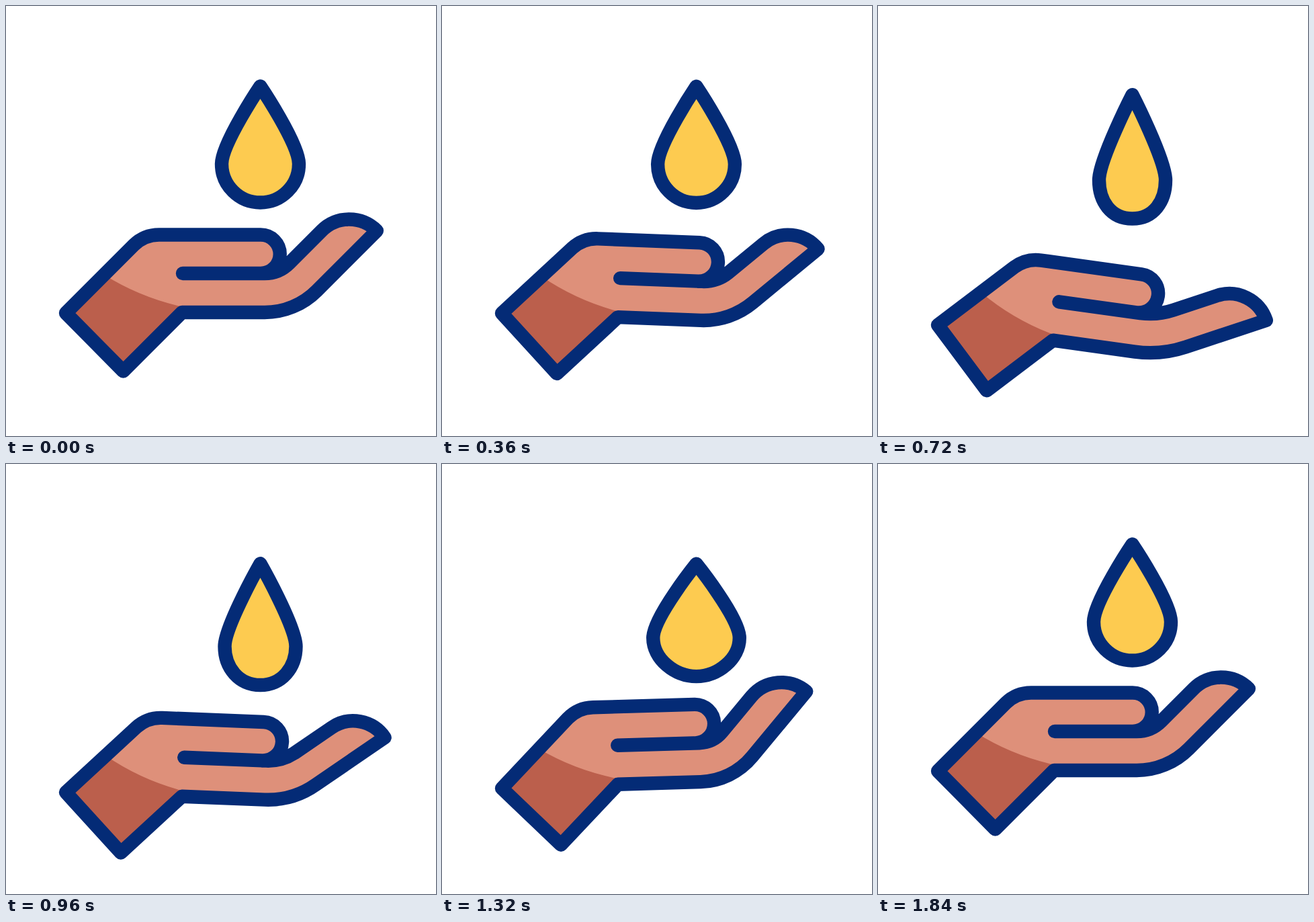
These frames come from a looping animation (640x640 px, 2 s). An HTML page:

```html
<!DOCTYPE html>
<html lang="en">
<head>
<meta charset="utf-8">
<title>Drop and hand</title>
<style>
  html, body { margin: 0; width: 100%; height: 100%; overflow: hidden; background: #fff; }
  svg { display: block; width: 100vw; height: 100vh; }
  .line { stroke: #042b76; stroke-width: 20.4; stroke-linecap: round; stroke-linejoin: round; }
</style>
</head>
<body>
<svg viewBox="0 0 640 640">
  <path id="drop" class="line" fill="#fdcb50"/>
  <g id="hand">
    <path id="skin" fill="#de907a"/>
    <path fill="#bb5f4c" d="M146 400Q200 434 264 448L262 456L174.5 543.5L89 457Z"/>
    <path id="outline" class="line" fill="none"/>
  </g>
</svg>
<script>
const LOOP = 2000, STEP = 40, ROUND = 0.5523;
const el = id => document.getElementById(id);
const drop = el('drop'), hand = el('hand'), skin = el('skin'), outline = el('outline');

function ease(t, from, to) {
  const s = Math.min(1, Math.max(0, (t - from) / (to - from)));
  return (1 - Math.cos(Math.PI * s)) / 2;
}

// Rises from 0 to 1 at the peak, then falls back to 0
const pulse = (t, from, peak, to) => ease(t, from, peak) - ease(t, peak, to);

// Control points of the raised fingers, bent up by an angle.
// The middle line of the bend keeps its length.
function fingers(deg) {
  const f = deg * Math.PI / 180, sin = Math.sin(f), cos = Math.cos(f);
  const half = 29, len = 68.5, tip = 2 * half, k = ROUND * tip;
  const r = 63.2 / f, h = 4 / 3 * Math.tan(f / 4);
  const up = h * (r - half), low = h * (r + half);
  const at = (a, b) => [385 + r * sin + a * cos + b * sin, 427 - r * (1 - cos) - a * sin + b * cos];
  return [
    [385 + up, 398], at(-up, -half), at(0, -half),
    at(len, -half),
    at(len + k, -half), at(len + tip, half - k), at(len + tip, half),
    at(0, half),
    at(-low, half), [385 + low, 456], [385, 456]
  ];
}

const rest = fingers(45), flatPose = fingers(26), curlPose = fingers(49.1);

function handPath(flat, curl) {
  const p = rest.map((q, i) => q.map((v, j) =>
    (v + flat * (flatPose[i][j] - v) + curl * (curlPose[i][j] - v)).toFixed(2)).join(' '));
  return `M263 398H385C${p[0]} ${p[1]} ${p[2]}L${p[3]}C${p[4]} ${p[5]} ${p[6]}L${p[7]}` +
    `C${p[8]} ${p[9]} ${p[10]}H262L174.5 543.5L89 457L190 356` +
    'A54 54 0 0 1 228 340.5H379A28.75 28.75 0 0 1 379 398';
}

// The round base keeps its handles while the sides and the tip move
function dropPath(y, wide, tall) {
  const p = (dx, py) => `${(378.5 + dx).toFixed(2)} ${py.toFixed(2)} `;
  const r = 57.5, k = ROUND * r, side = r + wide;
  const tip = 119.5 + y - tall / 2, base = 292.5 + y + tall / 2, mid = base - r;
  const top = p(0, tip);
  return `M${top}C${top}${p(side, mid - 30)}${p(side, mid)}` +
    `C${p(side, mid + k)}${p(k, base)}${p(0, base)}` +
    `C${p(-k, base)}${p(-side, mid + k)}${p(-side, mid)}C${p(-side, mid - 30)}${top}${top}Z`;
}

function draw(t) {
  const lift = pulse(t, 310, 1120, 1700);
  const turn = 7.9 * pulse(t, 160, 720, 1160) - 1.9 * pulse(t, 720, 1160, 1840);
  const flat = pulse(t, 210, 760, 1180), curl = pulse(t, 760, 1180, 1840);
  const stretch = pulse(t, 320, 850, 1160), squash = pulse(t, 850, 1160, 1840);

  drop.setAttribute('d', dropPath(36 * lift, 7.8 * squash - 9.3 * stretch, 13.3 * stretch - 6.4 * squash));
  hand.setAttribute('transform', `translate(0 ${35 * lift}) rotate(${turn} 89 457)`);
  const d = handPath(flat, curl);
  skin.setAttribute('d', d);
  outline.setAttribute('d', d);
}

const start = performance.now();
function tick() {
  const t = Math.max(0, performance.now() - start) % LOOP;
  draw(Math.floor(t / STEP) * STEP);
  requestAnimationFrame(tick);
}
tick();
</script>
</body>
</html>
```
